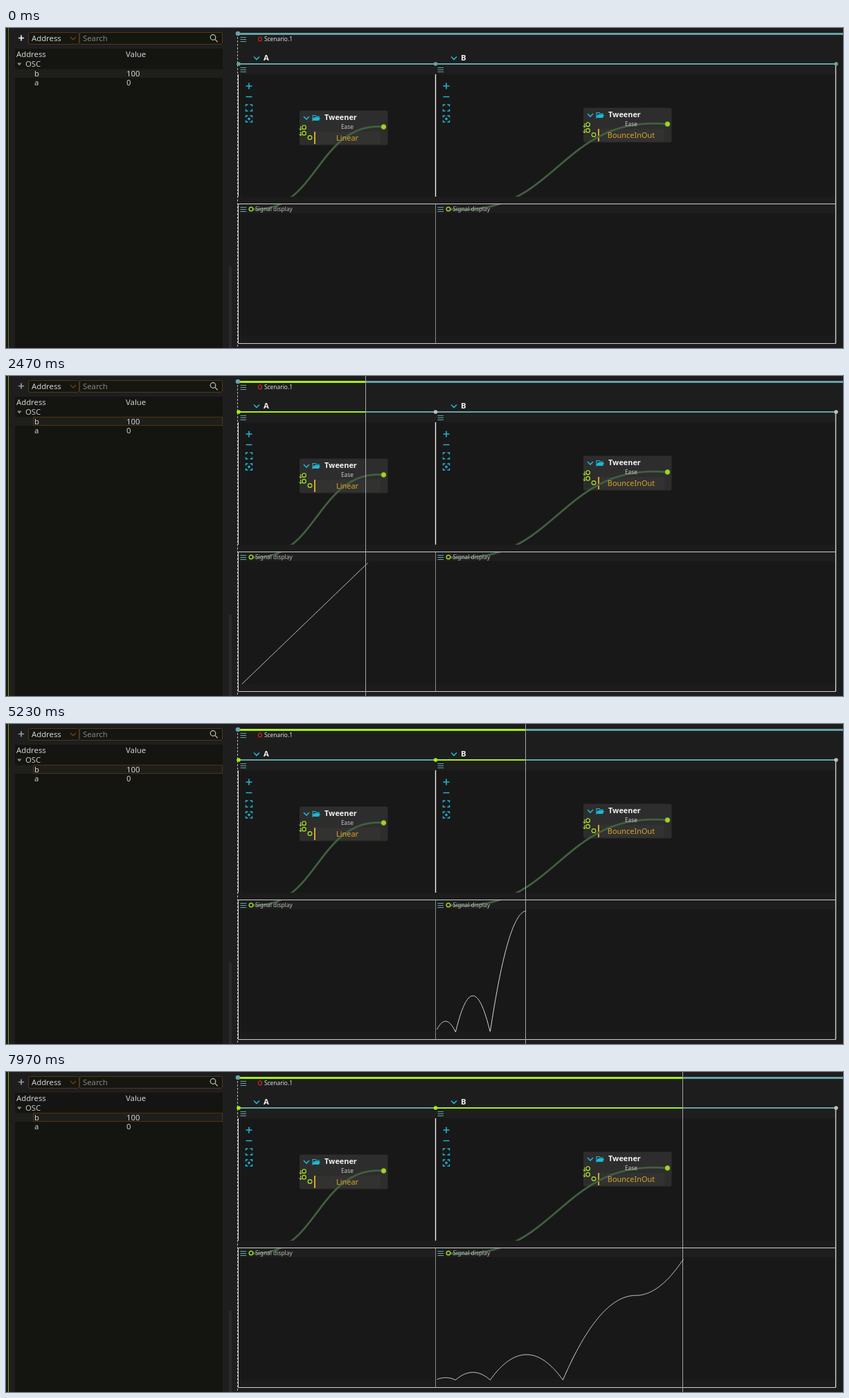
These frames come from a looping animation (1209x463 px, 8 s). An HTML page:

```html
<!DOCTYPE html>
<html lang="en">
<head>
<meta charset="utf-8">
<title>Tweener scenario</title>
<style>
  html, body { margin: 0; width: 100%; height: 100%; overflow: hidden; background: #1e1e1e; }
  svg { display: block; width: 100%; height: 100%; font-family: "Noto Sans", "Open Sans", sans-serif; }
  text { white-space: pre; }
</style>
</head>
<body>
<svg id="stage" viewBox="0 0 1209 463"></svg>
<script>
const LOOP = 8000;
const LEFT = 335.5, SPLIT = 620.5, RIGHT = 1198.5;
const TOP = 270.5, BOTTOM = 445.5;
const BAR = 8.5, RAIL = 52;
const TEAL = '#67a3a4', LIME = '#a6f00e', CYAN = '#1fb6d2', PORT = '#a2d32c', AMBER = '#d8a42a';
const stage = document.getElementById('stage');

// Markup helpers
const rect = (x, y, w, h, fill, extra = '') =>
  `<rect x="${x}" y="${y}" width="${w}" height="${h}" fill="${fill}" ${extra}/>`;
const stroke = (d, color, width = 1, extra = '') =>
  `<path d="${d}" fill="none" stroke="${color}" stroke-width="${width}" ${extra}/>`;
const dot = (x, y, r, fill, extra = '') =>
  `<circle cx="${x}" cy="${y}" r="${r}" fill="${fill}" ${extra}/>`;
const text = (x, y, size, fill, label, extra = '') =>
  `<text x="${x}" y="${y}" font-size="${size}" fill="${fill}" ${extra}>${label}</text>`;
const bold = 'font-weight="700"';
const ring = (x, y) => dot(x, y, 2.8, '#1c2410', `stroke="${PORT}" stroke-width="1.4"`);
const chevron = (x, y, color = CYAN, width = 1.6) =>
  stroke(`M${x - 4} ${y - 2}l4 4l4 -4`, color, width);
const menu = (x, y) =>
  stroke([-3, 0, 3].map(dy => `M${x - 4} ${y + dy + .5}h8.5`).join(''), TEAL, 1);

// Cables leave each end with a slight vertical overshoot
const cable = (x1, y1, x2, y2) => {
  const mid = (x1 + x2) / 2, sag = .043 * (x2 - x1);
  return stroke(`M${x1} ${y1}C${mid} ${y1 + sag} ${mid} ${y2 - sag} ${x2} ${y2}`,
    '#415f3f', 2.8, 'clip-path="url(#bodies)"');
};

function browser() {
  const field = (x, w) => rect(x, 6.5, w, 17, '#161610', 'rx="2" stroke="#503818"');
  return rect(0, 0, 3, 463, '#171a10') +
    '<path id="focus" d="M3.5 0V463"/>' +
    rect(13, 30, 300, 433, '#141510') +
    rect(13, 30, 300, 14, '#141412') +
    rect(13, 59.5, 300, 12.5, '#1e1e1b') +
    '<rect id="hover" x="39.5" y="59.5" width="273" height="12" fill="none" stroke="#4f3413"/>' +
    '<path id="plus" d="M18 14.5h8M22 10.5v8" stroke-width="1.7"/>' +
    field(32.5, 73) + field(106.5, 206) +
    text(37, 19.3, 11.3, '#d2d2d0', 'Address') +
    chevron(97, 15, '#74451a', 1.1) +
    text(111, 19.3, 11.3, '#858582', 'Search') +
    dot(299, 13.5, 3.8, 'none', 'stroke="#c2c2c2" stroke-width="1.2"') +
    stroke('M301.8 16.4l4 4', '#c2c2c2', 1.3) +
    text(15, 41.5, 11.3, '#d2d2d0', 'Address') +
    text(173, 41.5, 11.3, '#d2d2d0', 'Value') +
    '<path d="M16 50.5h6.5l-3.2 4z" fill="#8c8c88"/>' +
    text(28, 56.3, 11.3, '#c6c6c4', 'OSC') +
    text(41, 69.8, 11.3, '#d2d2d0', 'b') + text(174, 69.8, 11.3, '#d2d2d0', '100') +
    text(41, 83, 11.3, '#d2d2d0', 'a') + text(174, 83, 11.3, '#d2d2d0', '0') +
    rect(322, 345, 4, 118, '#292929');
}

function node(dx, dy) {
  return `<g transform="translate(${dx} ${dy})">` +
    rect(424, 119.5, 127.5, 50, '#2d2d2d', 'rx="2.5"') +
    rect(446, 150, 95, 18, '#323231') +
    chevron(434, 130) +
    stroke('M443 133.5v-7h4l1 1.5h4v1.5h-6.5z', CYAN, 1.2) +
    `<path d="M443 134l2.5 -4h8.5l-2 4z" fill="${CYAN}"/>` +
    text(460, 133, 10.9, '#f2f2f2', 'Tweener', bold) +
    stroke('M425.5 142v6M423.5 145.5l2 2.5l2 -2.5M425.5 150v6M423.5 153.5l2 2.5l2 -2.5', PORT, 1) +
    ring(430.5, 143.7) + ring(430.5, 152.3) + ring(439, 158.5) +
    rect(445, 150, 2, 18, AMBER) + '</g>';
}

function nodeLabels(dx, dy, ease) {
  return text(484 + dx, 146 + dy, 8.3, '#c8c8c8', 'Ease') +
    text(493 + dx, 162.8 + dy, 10.95, AMBER, ease, 'text-anchor="middle"') +
    dot(545.5 + dx, 143 + dy, 3.4, PORT, 'stroke="#8fc31f" stroke-width=".6"');
}

function tools(dx) {
  const corners = y => `M346.5 ${y - 2}v-2.5h3M352.5 ${y - 4.5}h3v2.5M355.5 ${y + 2}v2.5h-3M349.5 ${y + 4.5}h-3v-2.5`;
  return `<g transform="translate(${dx} 0)">` +
    stroke('M346.5 84h9M351 79.5v9M346.5 99.5h9', CYAN, 1.6) +
    stroke(corners(115.5) + corners(131.5), CYAN, 1.5) +
    stroke('M349 131.5h4M351 129.5v4', CYAN, 1.5) + '</g>';
}

function interval(dx, name) {
  return chevron(362 + dx, 43.5) + text(372 + dx, 47, 11.3, '#f0f0f0', name, bold) +
    menu(342.5 + dx, 60) + menu(342.5 + dx, 262) + tools(dx);
}

function score() {
  const width = RIGHT - LEFT;
  return rect(335, 0, 874, 463, '#1d1d1d') +
    rect(LEFT, 53, width, 14, '#1e1e1e') +
    rect(LEFT, 67, width, 177, '#181818') +
    rect(LEFT, 244, width, 10, '#1c1c1c') +
    rect(LEFT, 255, width, 13, '#1e1e1e') +
    rect(LEFT, 268, width, 177, '#181818') +
    rect(LEFT, 445, width, 11, '#1b1b1b') +
    menu(342.5, 16) +
    '<ellipse cx="367" cy="16" rx="2.4" ry="3" fill="none" stroke="#d3261d" stroke-width="1.2"/>' +
    text(373, 19.3, 8.4, '#e0e0e0', 'Scenario.1') +
    interval(0, 'A') + interval(285, 'B') +
    node(0, 0) + node(410, -4) +
    cable(354, 262, 545.5, 143) + cable(639, 262, 955.5, 139) +
    nodeLabels(0, 0, 'Linear') + nodeLabels(410, -4, 'BounceInOut') +
    ring(354, 262) + ring(639, 262) +
    text(360, 265, 8.4, '#bcbcbc', 'Signal display') +
    text(645.5, 265, 8.4, '#bcbcbc', 'Signal display') +
    stroke('M334.5 8V463', '#b8b8b8', 1, 'stroke-dasharray="3 2"') +
    stroke('M335.5 67V244M335.5 268V445', '#dcdcdc') +
    stroke('M620.5 67V244', '#f0f0f0', 1.4) +
    stroke('M1198.5 53V456', '#d0d0d0', 1.4) +
    stroke('M335.5 254.5H1198.5V456.5H335.5z', '#cfcfcf') +
    stroke('M620.5 255V456', '#8a8a8a') +
    stroke(`M335 ${BAR}H1209`, TEAL, 3) +
    stroke(`M335.5 ${RAIL}H1198.5`, TEAL, 2) +
    `<path id="played" fill="none" stroke="${LIME}" stroke-width="3"/>` +
    `<path id="running" fill="none" stroke="${LIME}" stroke-width="2"/>` +
    dot(335, 8, 3.3, TEAL) +
    ['start', 'middle', 'end'].map((id, i) =>
      dot([336, 620.5, 1199][i], RAIL, 2.8, TEAL, `id="${id}"`)).join('') +
    '<path id="signal" fill="none" stroke="#f0f0f0" stroke-width=".9"/>' +
    '<path id="head" fill="none" stroke="#a6a6a6" stroke-width="1"/>';
}

stage.innerHTML =
  '<clipPath id="bodies"><path d="M335 53H1209V244H335zM335 255H1209V456H335z"/></clipPath>' +
  browser() + score();

const part = {};
for (const id of ['focus', 'hover', 'plus', 'played', 'running', 'start', 'middle', 'end', 'signal', 'head'])
  part[id] = document.getElementById(id);
const set = (id, name, value) => part[id].setAttribute(name, value);

function bounceOut(p) {
  if (p < 4 / 11) return 121 * p * p / 16;
  if (p < 8 / 11) return 363 / 40 * p * p - 9.9 * p + 3.4;
  if (p < .9) return 4356 / 361 * p * p - 35442 / 1805 * p + 16061 / 1805;
  return 10.8 * p * p - 20.52 * p + 10.72;
}
const bounceInOut = p =>
  p < .5 ? (1 - bounceOut(1 - 2 * p)) / 2 : (1 + bounceOut(2 * p - 1)) / 2;
const linear = p => p;

// The display scales the recorded values to its full height
function signalPath(ease, from, to, first, tip) {
  if (tip <= first + .5) return '';
  const points = [];
  for (let x = first; x < tip; x += .5) points.push([x, ease((x - from) / (to - from))]);
  points.push([tip, ease((tip - from) / (to - from))]);
  const values = points.map(p => p[1]);
  const low = Math.min(...values), span = Math.max(...values) - low || 1;
  return 'M' + points.map(([x, v]) =>
    `${x.toFixed(2)} ${(BOTTOM - (v - low) / span * (BOTTOM - TOP)).toFixed(2)}`).join('L');
}

// The playhead moves at a slightly uneven pace
const pace = [[30, 336], [220, 337], [870, 389.5], [2470, 519.5], [4170, 662.5],
  [5230, 750.5], [6830, 885.5], [7970, 977.5], [8000, 980]];
function headAt(t) {
  const i = Math.max(1, pace.findIndex(p => t <= p[0]));
  const [t0, x0] = pace[i - 1], [t1, x1] = pace[i];
  return x0 + (x1 - x0) * (t - t0) / (t1 - t0);
}

function render(t) {
  const playing = t >= 30;
  const head = headAt(Math.max(30, t));
  const tip = 336 + .0829 * Math.max(0, t - 220);
  const second = head >= SPLIT;

  set('focus', 'stroke', playing ? '#86a31c' : '#66791c');
  set('hover', 'visibility', playing ? 'visible' : 'hidden');
  set('plus', 'stroke', playing ? '#9a9a9a' : '#f4f4f4');
  set('start', 'fill', playing ? LIME : TEAL);
  set('middle', 'fill', !playing ? TEAL : second ? LIME : '#bcc0c0');
  set('end', 'fill', playing ? '#bcc0c0' : TEAL);
  set('played', 'd', playing ? `M338 ${BAR}H${head}` : '');
  set('running', 'd', playing ? `M${second ? SPLIT : LEFT} ${RAIL}H${head}` : '');
  set('head', 'd', playing ? `M${Math.floor(head) + .5} 0V463` : '');
  set('signal', 'd', !playing ? '' : second
    ? signalPath(bounceInOut, SPLIT, RIGHT, 622.5, tip)
    : signalPath(linear, LEFT, SPLIT, 341, tip));
}

const begin = performance.now();
function tick() {
  render((performance.now() - begin) % LOOP);
  requestAnimationFrame(tick);
}
tick();
</script>
</body>
</html>
```
